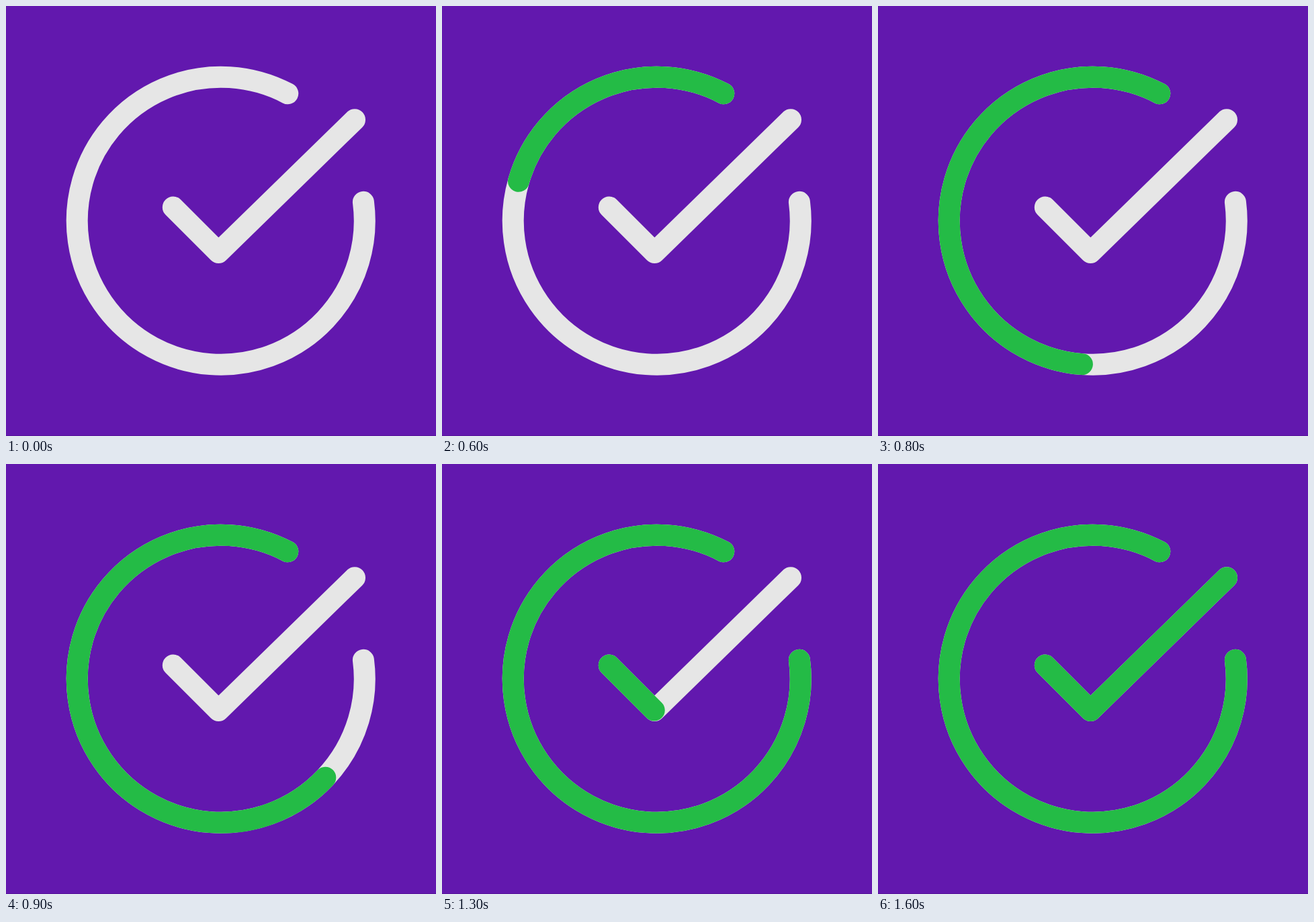
Recreate the animation shown at these times as an HTML page. Size 640x640 px, loop 4100 ms.

```html
<!DOCTYPE html>
<html lang="en">
<head>
<meta charset="utf-8">
<title>Check mark</title>
<style>
  html, body { margin: 0; height: 100%; overflow: hidden; background: #6218ae; }
  svg { display: block; width: 100%; height: 100%; }
  path { fill: none; stroke-width: 32; stroke-linecap: round; stroke-linejoin: round; }
  .base { stroke: #e6e6e6; }
  .fill { stroke: #24bb46; }
</style>
</head>
<body>
<svg viewBox="0 0 640 640">
  <rect y="639" width="640" height="1" fill="#57159b"/>
  <path class="base" d="M419.25 130.25A214 214 0 1 0 531.92 291.82"/>
  <path class="base" d="M248.8 299.5L316.3 367L519 169.2"/>
  <path class="fill" id="ring" pathLength="1" d="M419.25 130.25A214 214 0 1 0 531.92 291.82"/>
  <path class="fill" id="tick" pathLength="1" d="M248.8 299.5L316.3 367L519 169.2"/>
</svg>
<script>
const LOOP = 4100, STEP = 100;
const ring = document.getElementById('ring');
const tick = document.getElementById('tick');

// Grows a stroke in equal steps, the first one showing at `start`.
function grow(path, time, start, steps) {
  const done = Math.floor((time - start) / STEP) + 1;
  const part = Math.max(0, Math.min(1, done / steps));
  path.style.visibility = part ? 'visible' : 'hidden';
  path.style.strokeDasharray = part < 1 ? `${part} 2` : 'none';
}

const begin = performance.now();
function draw(now) {
  const time = Math.max(0, now - begin) % LOOP;
  grow(ring, time, 500, 6);
  grow(tick, time, 1300, 4);
  requestAnimationFrame(draw);
}
draw(begin);
</script>
</body>
</html>
```
